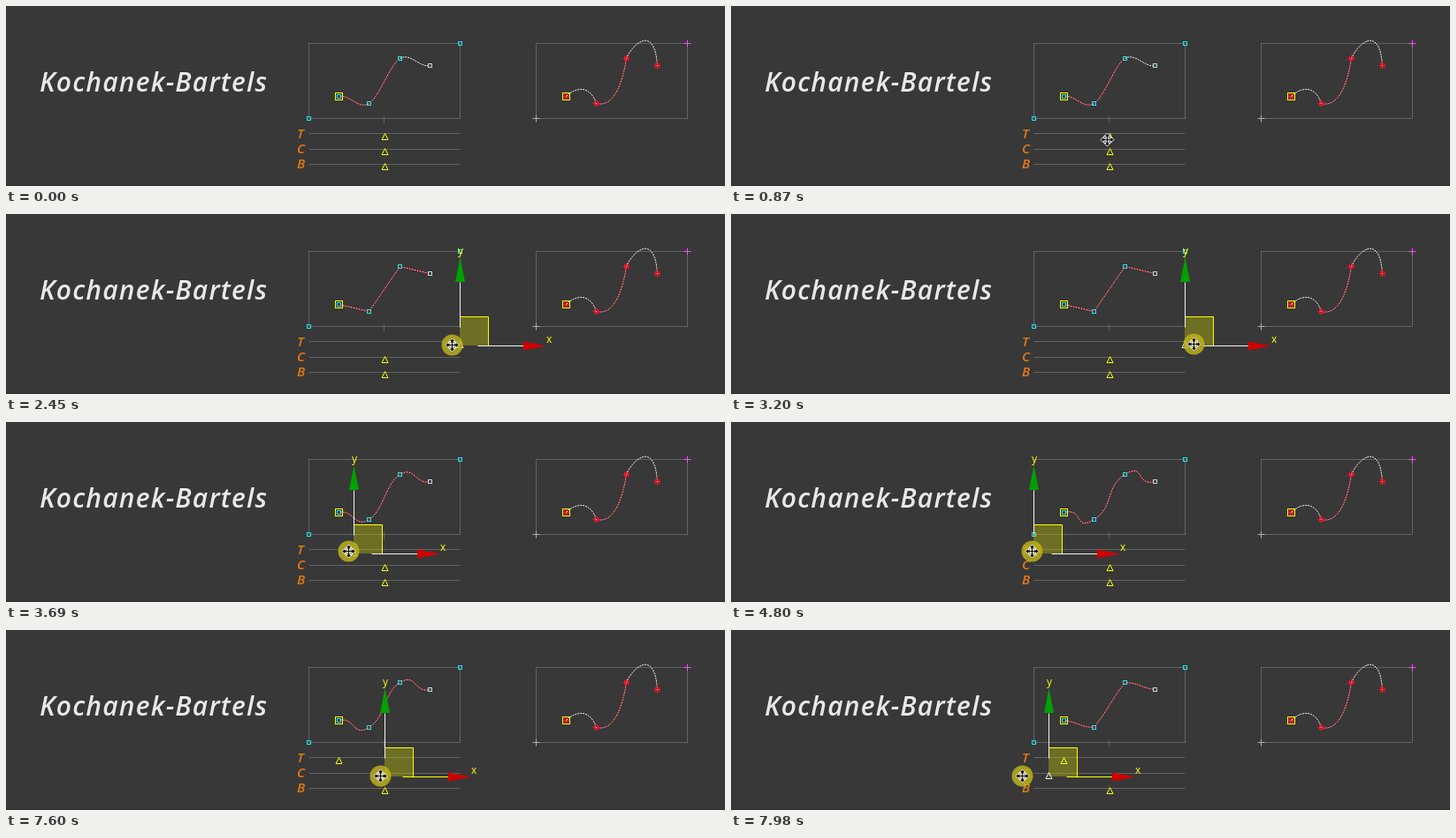
An HTML page with a canvas for the animation above (8 s loop, 813 by 204 pixels).

```html
<!DOCTYPE html>
<html lang="en">
<head>
<meta charset="utf-8">
<title>Kochanek-Bartels</title>
<style>
  html, body { margin: 0; width: 100%; height: 100%; overflow: hidden; background: #383838; }
  canvas { display: block; }
</style>
</head>
<body>
<canvas id="stage" width="813" height="204"></canvas>
<script>
const ctx = document.getElementById('stage').getContext('2d');
const LOOP = 8000, MIN = 342, MID = 428, MAX = 513;
const YELLOW = '#ffff00', CYAN = '#20e8f0', RED = '#ff1028', WHITE = '#f4f4f4', GREY = '#626262';
const clamp = (v, lo, hi) => Math.min(hi, Math.max(lo, v));

// Control points, with the box corners as outer neighbours
const knots = [[342, 127], [376, 102], [410, 110], [445, 59], [479, 67], [513, 42]];

// Pointer moves: start, end, steps, target pointer x, y, target handle x, ease-out power
const moves = [
  [280, 920, 12, 424, 150, 428, 1.5],
  [1090, 1160, 2, 426, 148, 428, 1],
  [1910, 2660, 11, 526, 148, 540, 1.26],
  [2750, 2820, 2, 547, 147, 540, 1],
  [3130, 3900, 12, 356, 146, 365, 1.4],
  [3980, 4310, 6, 340, 146, 342, 1],
  [4800, 5150, 6, 373, 152, 376, 1],
  [5750, 6230, 8, 425, 180, 376, 1.3],
  [6490, 6690, 4, 423, 165, 376, 1],
  [7040, 7040, 2, 423, 165, 428, 1],
  [7600, 7980, 11, 329, 165, 359, 1.1]
];
const pressed = [[1360, 1490], [1910, 5150], [7040, 7110], [7600, LOOP]];

function pose(t) {
  let state = [448, 196, MID];
  for (const [start, end, steps, x, y, handle, power] of moves) {
    if (t < start) break;
    const n = steps - 1;
    const step = end > start ? Math.floor((t - start) / (end - start) * n + 1e-6) : n;
    const k = 1 - Math.pow(1 - Math.min(1, step / n), power);
    state = [x, y, handle].map((v, i) => state[i] + (v - state[i]) * k);
  }
  return { x: Math.round(state[0]), y: Math.round(state[1]), handle: Math.round(clamp(state[2], MIN, MAX)) };
}

function line(color, ...points) {
  ctx.strokeStyle = color;
  ctx.beginPath();
  points.forEach(([x, y]) => ctx.lineTo(x + .5, y + .5));
  ctx.stroke();
}

function shape(fill, stroke, ...points) {
  ctx.beginPath();
  points.forEach(([x, y]) => ctx.lineTo(x, y));
  ctx.closePath();
  if (fill) { ctx.fillStyle = fill; ctx.fill(); }
  if (stroke) { ctx.strokeStyle = stroke; ctx.stroke(); }
}

function square(x, y, r, color) {
  ctx.strokeStyle = color;
  ctx.strokeRect(x - r + .5, y - r + .5, 2 * r, 2 * r);
}

function plus(x, y, r, color) {
  line(color, [x - r, y], [x + r, y]);
  line(color, [x, y - r], [x, y + r]);
}

function text(str, x, y, font, color, spacing = 0) {
  ctx.font = font + ' "Open Sans", "Noto Sans", sans-serif';
  ctx.letterSpacing = spacing + 'px';
  ctx.fillStyle = color;
  ctx.fillText(str, x, y);
}

function dotted(trace, color) {
  const pass = (style, dash) => {
    ctx.strokeStyle = style;
    ctx.setLineDash(dash);
    ctx.beginPath();
    trace();
    ctx.stroke();
  };
  if (color) pass(color, [2, 1]);
  else { pass(RED, [2, 1]); pass(WHITE, [0, 2, 1, 0]); }
  ctx.setLineDash([]);
}

// Kochanek-Bartels tangent at a knot; side is 1 when leaving, -1 when arriving
function tangent(i, axis, side, tension, continuity) {
  const before = knots[i][axis] - knots[i - 1][axis];
  const after = knots[i + 1][axis] - knots[i][axis];
  const c = side * continuity;
  return (1 - tension) / 2 * ((1 + c) * before + (1 - c) * after);
}

function spline(tension, continuity) {
  for (let i = 1; i < 4; i++) {
    const out = [0, 1].map(a => knots[i][a] + tangent(i, a, 1, tension, continuity) / 3 + .5);
    const into = [0, 1].map(a => knots[i + 1][a] - tangent(i + 1, a, -1, tension, continuity) / 3 + .5);
    const end = knots[i + 1].map(v => v + .5);
    const plain = i === 3 && tension === 0 && continuity === 0;
    dotted(() => {
      ctx.moveTo(knots[i][0] + .5, knots[i][1] + .5);
      ctx.bezierCurveTo(...out, ...into, ...end);
    }, plain ? WHITE : null);
  }
}

function box(x) {
  ctx.strokeStyle = GREY;
  ctx.strokeRect(x + .5, 42.5, 171, 85);
}

function editor(sliders, selected) {
  box(342);
  line(GREY, [427, 124], [427, 132]);
  spline(...sliders.slice(0, 2).map(x => (x - MID) / (x > MID ? MAX - MID : MID - MIN)));
  square(342, 127, 2, CYAN);
  square(513, 42, 2, CYAN);
  knots.slice(1, 5).forEach(([x, y], i) => square(x, y, 2, i === 3 ? '#b8dede' : CYAN));
  square(376, 102, 4, YELLOW);

  [144, 162, 179].forEach((y, i) => {
    line(GREY, [342, y], [513, y]);
    text('TCB'[i], 329, [150, 167, 184][i], 'italic 600 15px', '#e87a14');
  });
  return () => [148, 165, 182].forEach((y, i) => {
    const x = sliders[i] + .5;
    shape(null, i === selected ? WHITE : YELLOW, [x, y - 3.5], [x + 3.5, y + 3.5], [x - 3.5, y + 3.5]);
  });
}

function reference() {
  box(599);
  plus(599, 127, 4, '#b0b0b0');
  plus(770, 42, 4, '#f050f0');
  const curves = [
    [633, 102, 644, 91, 660, 89, 667, 110],
    [667, 110, 688, 115, 697, 84, 701, 59],
    [701, 59, 708, 42, 733, 20, 736, 67]
  ];
  curves.forEach((c, i) => dotted(() => {
    const [x, y, ...rest] = c.map(v => v + .5);
    ctx.moveTo(x, y);
    ctx.bezierCurveTo(...rest);
  }, i === 1 ? null : WHITE));
  [[633, 102], [667, 110], [701, 59], [736, 67]].forEach(([x, y]) => {
    plus(x, y, 4, RED);
    square(x, y, 2, RED);
    ctx.fillStyle = '#ffb0f0';
    ctx.fillRect(x, y, 1, 1);
  });
  square(633, 102, 4, YELLOW);
}

function gizmo(x, y, xColor, yColor) {
  ctx.fillStyle = 'rgba(205,205,0,.36)';
  ctx.fillRect(x, y - 33, 33, 33);
  line(YELLOW, [x, y - 33], [x + 32, y - 33], [x + 32, y]);
  line(yColor, [x, y - 21], [x, y - 72]);
  line(xColor, [x + 20, y], [x + 72, y]);
  shape('#00a000', null, [x + .5, y - 100], [x + 6, y - 72], [x - 5, y - 72]);
  shape('#d00000', null, [x + 98, y + .5], [x + 72, y + 5.5], [x + 72, y - 4.5]);
  text('y', x - 2, y - 103, '12px', YELLOW);
  text('x', x + 98, y - 3, '12px', YELLOW);
}

function pointer(x, y, down) {
  if (down) {
    ctx.fillStyle = 'rgba(190,180,24,.82)';
    ctx.beginPath();
    ctx.arc(x + .5, y + .5, 12, 0, 2 * Math.PI);
    ctx.fill();
  }
  ctx.save();
  ctx.translate(x + .5, y + .5);
  for (let i = 0; i < 4; i++) {
    shape('#101010', WHITE, [-1.5, -1.5], [-1.5, -4], [-3.5, -4], [0, -7.5], [3.5, -4], [1.5, -4], [1.5, -1.5]);
    ctx.rotate(Math.PI / 2);
  }
  ctx.restore();
  plus(x, y, 2, '#101010');
}

function draw(t) {
  const { x, y, handle } = pose(t);
  const onContinuity = t >= 7040;
  const selected = t < 1360 ? -1 : onContinuity ? 1 : 0;
  const sliders = [onContinuity ? 376 : handle, onContinuity ? handle : MID, MID];

  ctx.lineWidth = 1;
  ctx.fillStyle = '#383838';
  ctx.fillRect(0, 0, 813, 204);
  ctx.fillStyle = '#303030';
  ctx.fillRect(0, 203, 813, 1);
  text('Kochanek-Bartels', 38, 97, 'italic 600 30px', '#e8e8e8', 1.2);
  const handles = editor(sliders, selected);
  reference();
  if (selected >= 0) {
    const yActive = t >= 5150 && !onContinuity;
    gizmo(handle, onContinuity ? 166 : 149, onContinuity ? YELLOW : WHITE, yActive ? YELLOW : WHITE);
  }
  handles();
  if (t >= 280) pointer(x, y, pressed.some(([a, b]) => t >= a && t < b));
}

const begin = performance.now();
function tick() {
  draw((performance.now() - begin) % LOOP);
  requestAnimationFrame(tick);
}
tick();
</script>
</body>
</html>
```
